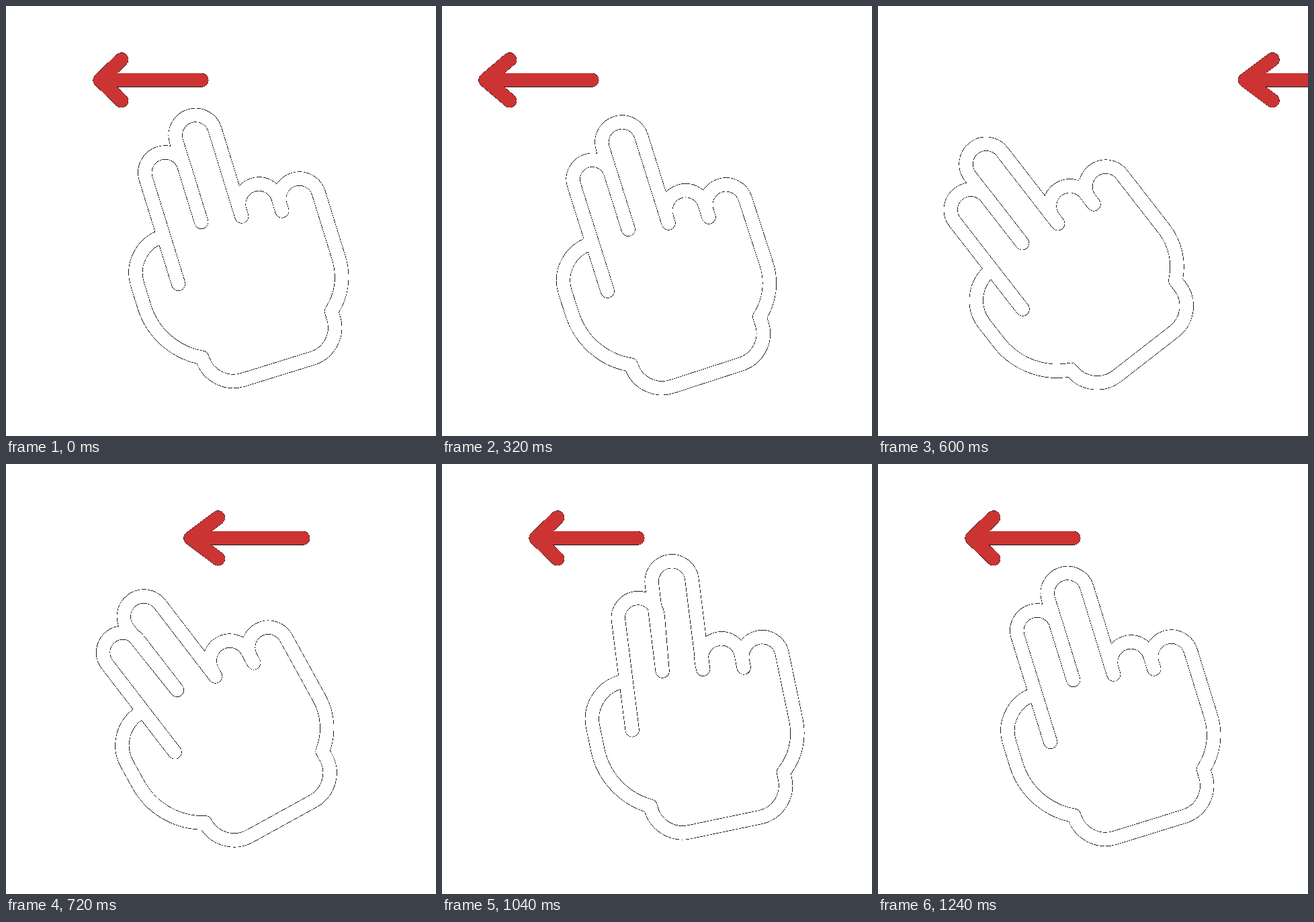
An HTML page for the animation above (1480 ms loop, 640 px wide and 640 px high).

```html
<!DOCTYPE html>
<html lang="en">
<head>
<meta charset="utf-8">
<title>Two-finger swipe left</title>
<style>
  html, body { margin: 0; width: 100%; height: 100%; overflow: hidden; background: #fff; }
  svg { display: block; width: 100vw; height: 100vh; }
  path { fill: none; stroke-linecap: round; stroke-linejoin: round; shape-rendering: crispEdges; }
  .edge { stroke: #1c1c1c; stroke-width: 21.2; }
  .skin { stroke: #fff; stroke-width: 19.8; }
  .red { stroke: #cc3333; stroke-width: 20.3; }
</style>
</head>
<body>
<svg viewBox="0 0 640 640">
  <g id="arrow"><path class="edge"/><path class="red"/></g>
  <g id="hand"><path class="edge"/><path class="skin"/></g>
</svg>
<script>
const LOOP = 1480, STEP = 40;
const LEFT = -103, PITCH = 59.8, RADIUS = 30;
const hand = document.getElementById('hand');
const arrow = document.getElementById('arrow');

// Four fingers side by side: height of each tip centre and of the groove on its left
const fingers = [
  { tip: -124.4, root: 39.7 },
  { tip: -164, root: -38.2 },
  { tip: -38.2, root: -28.5 },
  { tip: -28, root: -18.5 },
];
const pivots = [{ x: -90, y: 0 }, { x: LEFT + 2 * PITCH, y: -28.5 }];

// From the little finger round the wrist and thumb, back to the index finger
const PALM = 'V75A92 92 0 0 1 102.5 146V156.5A48 48 0 0 1 54.5 204.5H-53' +
  'A48.5 48.5 0 0 1-101.8 156.5V155A110 110 0 0 1-161.5 57V22A57 57 0 0 1-104.5-35';

const home = { x: 343.3, y: 345.2, turn: -17.2 };
const away = { x: 272.2, y: 356.5, turn: -37.9 };
const palmKeys = [
  [80, home],
  [240, { x: 388.1, y: 354.2, turn: 1.9 }],
  [400, away],
  [600, away],
  [920, { x: 394.4, y: 332.8, turn: -9.3 }],
  [1240, home],
];

// The two long fingers trail behind the palm
const rest = { lean: 0, slide: 0, pinch: 0 };
const lead = { lean: 4.6, slide: 1, pinch: 0.5 };
const swayKeys = [
  [80, rest],
  [200, { lean: 1.4, slide: 6.5, pinch: 4 }],
  [400, rest],
  [600, rest],
  [720, { lean: -8.8, slide: 6, pinch: 0.5 }],
  [880, lead],
  [1040, lead],
  [1240, rest],
];

const span = (t, a, b) => Math.min(1, Math.max(0, (t - a) / (b - a)));
const smooth = u => u * u * (3 - 2 * u);
const rad = deg => deg * Math.PI / 180;

function sample(keys, t) {
  let i = 0;
  while (i < keys.length - 2 && t >= keys[i + 1][0]) i++;
  const [t0, a] = keys[i], [t1, b] = keys[i + 1];
  const u = smooth(span(t, t0, t1)), out = {};
  for (const k in a) out[k] = a[k] + (b[k] - a[k]) * u;
  return out;
}

function rotate(p, pivot, deg) {
  const c = Math.cos(rad(deg)), s = Math.sin(rad(deg));
  const x = p.x - pivot.x, y = p.y - pivot.y;
  return { x: pivot.x + x * c - y * s, y: pivot.y + x * s + y * c };
}

// Half circle over a fingertip, from its left side to its right side
function arch({ x, y }, r, lean) {
  const dx = r * Math.cos(rad(lean)), dy = r * Math.sin(rad(lean));
  return `L${x - dx} ${y - dy}A${r} ${r} 0 0 1 ${x + dx} ${y + dy}`;
}

function handPath({ lean, slide, pinch }) {
  let d = '';
  fingers.forEach((f, i) => {
    const x = LEFT + PITCH * i;
    let root = { x, y: f.root }, tip = { x: x + RADIUS, y: f.tip };
    let r = RADIUS, bend = 0;
    if (pivots[i]) {
      bend = lean;
      tip = rotate(tip, pivots[i], lean);
    }
    if (i === 0) {
      root = rotate(root, pivots[0], lean);
      root.x += slide;
      tip.x += slide - pinch;
      tip.y -= pinch;
      r -= pinch;
    }
    d += `${i ? 'L' : 'M'}${root.x} ${root.y}${arch(tip, r, bend)}`;
  });
  return d + PALM;
}

function setPath(group, d) {
  for (const p of group.children) p.setAttribute('d', d);
}

function drawHand(t) {
  const { x, y, turn } = sample(palmKeys, t);
  setPath(hand, handPath(sample(swayKeys, t)));
  hand.setAttribute('transform', `translate(${x} ${y}) rotate(${turn})`);
}

// Speeds up off the left side, then slows down in from the right; speed stretches it
function drawArrow(t) {
  const dx = t < 540
    ? -320 * span(t, 200, 520) ** 1.58
    : 540 * (1 - span(t, 560, 880)) ** 1.84;
  const pull = Math.min(1, Math.abs(dx) / 150);
  const y = 110.3, nose = 140 + dx - 16 * pull, barb = 171.8 + dx - 7 * pull;
  setPath(arrow, `M${291 + dx} ${y}H${nose}M${barb} ${y - 30.6}L${nose} ${y}L${barb} ${y + 30.6}`);
}

function frame(now) {
  const t = Math.floor(now % LOOP / STEP) * STEP;
  drawHand(t);
  drawArrow(t);
  requestAnimationFrame(frame);
}
frame(performance.now());
</script>
</body>
</html>
```
